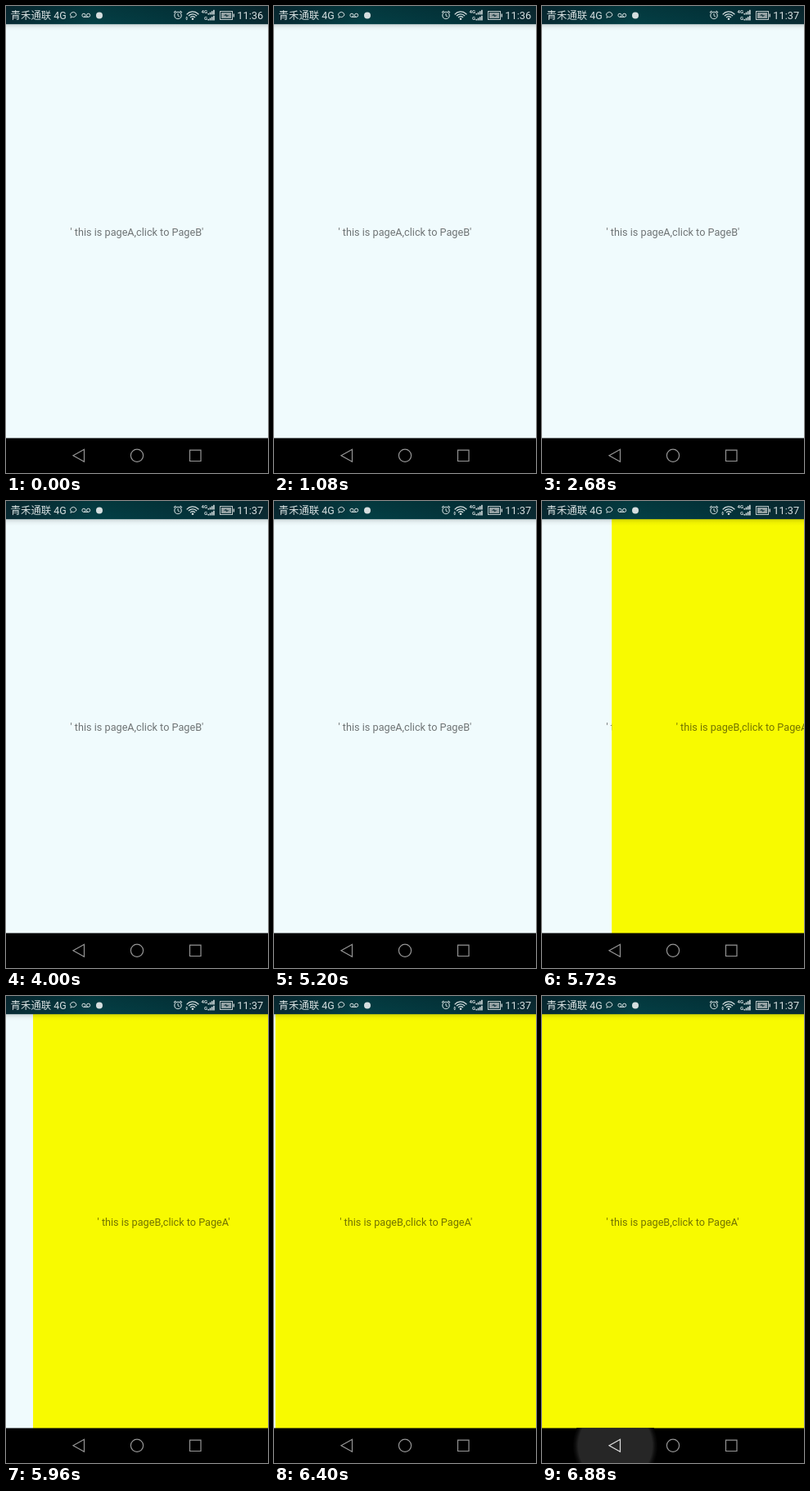
Write an HTML page with a canvas that moves like this. It is 320x569 px and loops after 8 s.

```html
<!DOCTYPE html>
<html lang="en">
<head>
<meta charset="utf-8">
<title>Page slide</title>
<style>
  html, body { margin: 0; width: 100%; height: 100%; overflow: hidden; background: #000; }
  canvas { display: block; width: 320px; height: 569px; }
</style>
</head>
<body>
<canvas id="stage"></canvas>
<script>
const W = 320, H = 569, BAR = 22.2, NAV = 526.3;
const LOOP = 8000, STEP = 40;
const SLIDE_SHOWN = 5520, SLIDE_END = 6640, PRESS = 6880;
const EASE_START = 5255, EASE_TIME = 1477, EASE_POWER = 3.5;
const CLOCK_TICK = 1880, WIFI_IDLE = 800, WIFI_BUSY = 4920;
const LIGHT = '#d5dedf';
const SANS = 'Roboto, "Noto Sans CJK SC", "Noto Sans CJK", sans-serif';

const canvas = document.getElementById('stage');
const ratio = window.devicePixelRatio || 1;
canvas.width = W * ratio;
canvas.height = H * ratio;
const ctx = canvas.getContext('2d');
ctx.scale(ratio, ratio);

function withStops(gradient, colors) {
  colors.forEach((c, i) => gradient.addColorStop(i / (colors.length - 1), c));
  return gradient;
}

function linear(x0, y0, x1, y1, ...colors) {
  return withStops(ctx.createLinearGradient(x0, y0, x1, y1), colors);
}

function rect(x, y, w, h, color) {
  ctx.fillStyle = color;
  ctx.fillRect(x, y, w, h);
}

function disc(x, y, r, color) {
  ctx.fillStyle = color;
  ctx.beginPath();
  ctx.arc(x, y, r, 0, Math.PI * 2);
  ctx.fill();
}

function arc(x, y, r, from, to, color, width) {
  ctx.strokeStyle = color;
  ctx.lineWidth = width;
  ctx.beginPath();
  ctx.arc(x, y, r, from, to);
  ctx.stroke();
}

function ring(x, y, r, color, width = 1) {
  arc(x, y, r, 0, Math.PI * 2, color, width);
}

function trace(points, closed) {
  ctx.beginPath();
  points.forEach(([x, y]) => ctx.lineTo(x, y));
  if (closed) ctx.closePath();
}

function line(points, color, width = 1, closed = false) {
  ctx.strokeStyle = color;
  ctx.lineWidth = width;
  trace(points, closed);
  ctx.stroke();
}

function shape(points, color) {
  ctx.fillStyle = color;
  trace(points, true);
  ctx.fill();
}

function text(value, x, y, size, color, weight = 400) {
  ctx.font = `${weight} ${size}px ${SANS}`;
  ctx.fillStyle = color;
  ctx.fillText(value, x, y);
}

function page(x, color, label) {
  rect(x, 0, W, H, color);
  text(label, x + 78.5, 279.5, 12.68, 'rgba(0,0,0,.54)');
}

function signal(y) {
  for (let i = 0; i < 4; i++) {
    const h = 1.5 + i * 1.4;
    rect(246.5 + i * 2.2, y - h, 1.6, h, LIGHT);
  }
}

function wifi(busy) {
  const up = -Math.PI / 2, spread = 0.87;
  for (const r of [3.8, 6.7, 9.6]) arc(228, 16.5, r, up - spread, up + spread, LIGHT, 1.3);
  disc(228, 15.7, 1.3, LIGHT);
  if (busy) {
    shape([[219.2, 14.6], [220.7, 12.8], [222.2, 14.6]], LIGHT);
    shape([[219.2, 15.4], [220.7, 17.2], [222.2, 15.4]], LIGHT);
  }
}

function alarm() {
  ring(210, 11.5, 4.2, LIGHT, 1.1);
  line([[210, 9], [210, 11.8], [212, 13]], LIGHT);
  line([[205, 8.2], [207.4, 6]], LIGHT, 1.1);
  line([[212.6, 6], [215, 8.2]], LIGHT, 1.1);
}

function battery() {
  ctx.strokeStyle = '#bdc8c9';
  ctx.lineWidth = 1;
  ctx.strokeRect(261.5, 6.5, 15, 10);
  rect(263, 8, 12, 7, '#94a1a3');
  rect(277.5, 9.5, 1.5, 4, '#bdc8c9');
  shape([[265.5, 11.5], [269.3, 9.5], [269.3, 11], [272.8, 11.5], [268.8, 13.6], [268.8, 12]], '#24434a');
}

function notifications() {
  ctx.strokeStyle = LIGHT;
  ctx.lineWidth = 1;
  ctx.beginPath();
  ctx.ellipse(82.2, 10.5, 3.6, 3, 0, 2.5, 2.1 + Math.PI * 2);
  ctx.lineTo(79.2, 14.5);
  ctx.closePath();
  ctx.stroke();

  ring(95, 11.3, 2.1, LIGHT);
  ring(100.6, 11.3, 2.1, LIGHT);
  line([[95, 13.4], [100.6, 13.4]], LIGHT);

  disc(114, 11.5, 4, LIGHT);
}

function statusBar(t) {
  rect(0, BAR, W, 8, linear(0, BAR, 0, BAR + 8, 'rgba(0,0,0,.15)', 'rgba(0,0,0,.04)', 'rgba(0,0,0,0)'));
  rect(0, 0, W, BAR, linear(0, 0, W, 0, '#082a33', '#044046', '#03363d', '#0a2a32'));
  rect(0, 0, W, BAR, linear(0, 0, 0, BAR, 'rgba(0,0,0,.12)', 'rgba(0,0,0,0)'));
  text('青禾通联 4G', 5.5, 16, 12.44, LIGHT);
  notifications();
  alarm();
  wifi(t < WIFI_IDLE || t >= WIFI_BUSY);
  text('4G', 238.5, 8.5, 6, LIGHT, 700);
  text('G', 242, 16.5, 6, LIGHT, 700);
  signal(10.5);
  signal(17.5);
  battery();
  text(t < CLOCK_TICK ? '11:36' : '11:37', 282.3, 16, 12.8, LIGHT);
}

function navBar(pressed) {
  const gray = '#969696';
  ctx.save();
  ctx.beginPath();
  ctx.rect(0, NAV, W, H - NAV);
  ctx.clip();
  rect(0, NAV, W, H - NAV, '#000');
  if (pressed) {
    const glow = ctx.createRadialGradient(89.5, 548, 45, 89.5, 548, 52);
    disc(89.5, 548, 52, withStops(glow, ['#262626', '#0e0e0e', '#000']));
  }
  line([[82, 547.8], [95.5, 540.3], [95.5, 555.3]], pressed ? '#e0e0e0' : gray, 1.2, true);
  ring(160, 547.8, 7.6, gray, 1.2);
  line([[224.5, 541.2], [238, 541.2], [238, 554.5], [224.5, 554.5]], gray, 1.2, true);
  ctx.restore();
}

// Left edge of the incoming page, slowing down as it arrives.
function slideOffset(t) {
  if (t < SLIDE_SHOWN) return W;
  if (t >= SLIDE_END) return 0;
  const now = Math.floor(t / STEP) * STEP;
  return W * (1 - (now - EASE_START) / EASE_TIME) ** EASE_POWER;
}

function draw(t) {
  const edge = slideOffset(t);
  page(0, '#f0fbfd', "' this is pageA,click to PageB'");
  if (edge < W) page(edge, '#f8fa00', "' this is pageB,click to PageA'");
  statusBar(t);
  navBar(t >= PRESS);
}

const start = performance.now();
function tick() {
  draw((performance.now() - start) % LOOP);
  requestAnimationFrame(tick);
}
tick();
</script>
</body>
</html>
```
